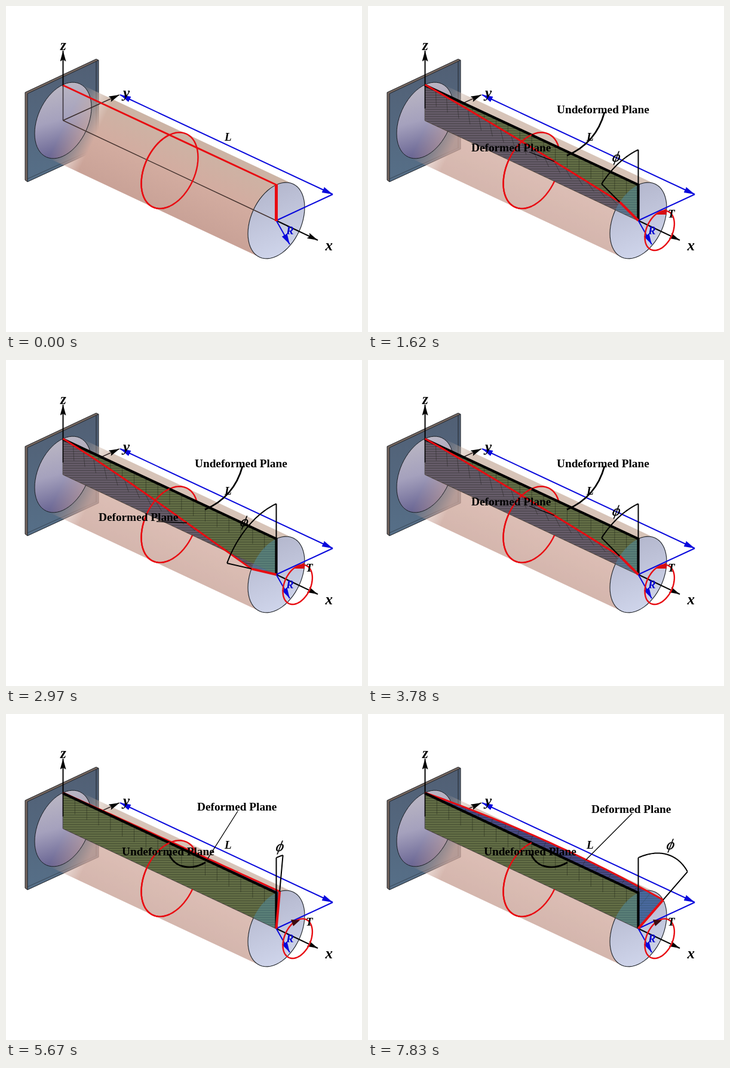
These frames come from a looping animation (596x547 px, 8000 ms). An HTML page:

```html
<!DOCTYPE html>
<html lang="en">
<head>
<meta charset="utf-8">
<title>Shaft in torsion</title>
<style>
  html, body { margin: 0; width: 100%; height: 100%; overflow: hidden; background: #fff; }
  svg { display: block; width: 596px; height: 547px; }
  text { font-family: "Liberation Serif", "Times New Roman", serif; font-weight: bold; }
  .it { font-style: italic; }
  .label { font-size: 19.3px; }
  .line { fill: none; stroke: #000; stroke-width: 2; }
  .blue { fill: none; stroke: #0808dc; stroke-width: 2; }
  .red { fill: none; stroke: #e80c12; stroke-width: 2.4; }
  .edge { fill: none; stroke: #1c2026; stroke-width: 1; }
  .grid { fill: none; stroke: #14180f; stroke-width: 1; opacity: .4; }
</style>
</head>
<body>
<svg viewBox="0 0 596 547">
  <defs>
    <linearGradient id="plateFill" x1="0" y1="0" x2="0" y2="1">
      <stop offset="0" stop-color="#515f74"/><stop offset="1" stop-color="#566f88"/>
    </linearGradient>
    <linearGradient id="baseFill" x1=".3" y1="0" x2=".5" y2="1">
      <stop offset="0" stop-color="#bdb9c4"/><stop offset=".5" stop-color="#a5a1bd"/><stop offset="1" stop-color="#625e8e"/>
    </linearGradient>
    <linearGradient id="endFill" x1=".3" y1="0" x2=".6" y2="1">
      <stop offset="0" stop-color="#b2b5cb"/><stop offset="1" stop-color="#d0d6ec"/>
    </linearGradient>
    <linearGradient id="wallFill" gradientUnits="userSpaceOnUse" x1="302" y1="215" x2="246" y2="337">
      <stop offset="0" stop-color="#ccb4a5"/><stop offset=".5" stop-color="#d3aca0"/><stop offset="1" stop-color="#c9a297"/>
    </linearGradient>
    <linearGradient id="fade" gradientUnits="userSpaceOnUse" x1="100" y1="194" x2="150" y2="218">
      <stop offset="0" stop-color="#000"/><stop offset="1" stop-color="#fff"/>
    </linearGradient>
    <mask id="wallMask" maskUnits="userSpaceOnUse" x="0" y="0" width="596" height="547">
      <rect width="596" height="547" fill="url(#fade)"/>
    </mask>
    <pattern id="hatch" patternUnits="userSpaceOnUse" width="27" height="4">
      <path d="M0 1.5H27" stroke="#10140e" stroke-width="1" opacity=".36"/>
    </pattern>
    <clipPath id="endClip"><path id="endClipPath"/></clipPath>
    <marker id="tipBlack" markerUnits="userSpaceOnUse" markerWidth="18" markerHeight="10" refX="18" refY="5" orient="auto">
      <path d="M0 0L18 5L0 10L3 5Z" fill="#050505"/>
    </marker>
    <marker id="tipBlue" markerUnits="userSpaceOnUse" markerWidth="18" markerHeight="10" refX="18" refY="5" orient="auto-start-reverse">
      <path d="M0 0L18 5L0 10Z" fill="#0808dc"/>
    </marker>
  </defs>

  <!-- wall plate -->
  <path d="M32 145L151 89L155 91L36 147V295L32 292Z" fill="#75665f"/>
  <path d="M36 147L155 91V240L36 295Z" fill="url(#plateFill)"/>
  <path class="edge" d="M32 145L151 89L155 91V240L36 295L32 292ZM36 147L155 91M36 147V295M151 93V239"/>
  <path class="edge" d="M36 290L151 238" opacity=".5"/>
  <path id="base" fill="url(#baseFill)"/>
  <path id="wall" fill="url(#wallFill)" mask="url(#wallMask)"/>
  <path id="baseEdge" class="edge"/>
  <path id="end" fill="url(#endFill)" stroke="#1c2026" stroke-width="1.1"/>

  <!-- axes -->
  <path class="line" d="M95.5 192L190 149" style="stroke:#3a2d2c;stroke-width:1.5" marker-end="url(#tipBlack)"/>
  <path d="M95.5 192L452.5 360" stroke="#43322e" stroke-width="1.4"/>
  <path d="M95.5 192V133" stroke="#3b333b" stroke-width="1.6"/>
  <path class="line" d="M95.5 135V75" marker-end="url(#tipBlack)"/>
  <path id="ring" class="red"/>

  <!-- longitudinal planes -->
  <g id="planes">
    <g id="flat"><path fill="#626d45"/><path fill="url(#hatch)"/><path class="grid"/></g>
    <g id="bent"><path/><path fill="url(#hatch)"/><path class="grid"/></g>
  </g>
  <g id="overlay">
    <g clip-path="url(#endClip)"><path id="tint" fill="#4a9ac4" opacity=".38"/></g>
    <path class="line" d="M95.5 133V172" style="stroke-width:1.5"/>
    <path id="helixUnder" class="red" style="stroke-width:3"/>
    <path class="line" d="M95.5 133L452.5 300V360" style="stroke-width:4.2"/>
    <path id="helixOver" class="red" style="stroke-width:3"/>
  </g>
  <path id="ringFront" class="red"/>
  <path id="rest" d="M95.5 133L452.5 300" class="red" style="stroke-width:3"/>

  <!-- dimensions and tip of the x axis -->
  <path class="blue" d="M191 149L547 316" marker-start="url(#tipBlue)" marker-end="url(#tipBlue)"/>
  <path class="blue" d="M452.5 360L547 316"/>
  <path class="line" d="M452.5 360L522 393" marker-end="url(#tipBlack)"/>
  <path class="blue" d="M452.5 360L475 400" marker-end="url(#tipBlue)"/>
  <path id="restEnd" d="M452.5 299V361" class="red" style="stroke-width:5"/>

  <text class="it" x="91" y="74" font-size="25">z</text>
  <text class="it" x="196" y="154" font-size="25">y</text>
  <text class="it" x="534.5" y="410" font-size="25">x</text>
  <text class="it" x="366" y="226" font-size="19">L</text>
  <text class="it" x="469" y="383" font-size="19" fill="#0000d0">R</text>

  <!-- twist -->
  <g id="twist">
    <path id="phiArc" class="line"/>
    <path id="spoke" class="red" style="stroke-width:4"/>
    <text id="phi" class="it" text-anchor="middle" y="8" font-size="25" style="font-weight:normal" stroke="#000" stroke-width=".4">ϕ</text>
    <path id="torque" class="red"/>
    <path id="torqueTip"/>
    <text class="it" x="502" y="355" font-size="19">T</text>
    <path id="flatLead" class="line" style="stroke-width:2.8"/>
    <path id="bentLead" class="line" style="stroke-width:1.3"/>
    <text id="flatLabel" class="label">Undeformed Plane</text>
    <text id="bentLabel" class="label">Deformed Plane</text>
  </g>
</svg>
<script>
const $ = id => document.getElementById(id);
const LOOP = 8000, STEP = 270, DEG_PER_STEP = 6.8;
const RAD = Math.PI / 180;

// Point on the shaft: s along the axis (0..1), r in radii, a in degrees from z.
function point(s, r, a) {
  const c = r * Math.cos(a * RAD), n = r * Math.sin(a * RAD);
  return [95.5 + 357 * s - 47.5 * n, 192 + 168 * s - 60 * c + 22 * n];
}
const path = pts => "M" + pts.map(p => p.map(v => v.toFixed(2)).join(" ")).join("L");
const range = (n, f) => Array.from({ length: n + 1 }, (_, i) => f(i / n));
const arc = (s, r, from, to) => path(range(60, u => point(s, r, from + (to - from) * u)));
const helix = a => range(40, s => point(s, 1, a * s));
const sheet = a => path([...helix(a), point(1, 0, 0), point(0, 0, 0)]) + "Z";
const ribs = a => range(18, s => path([point(s, 1, a * s), point(s, .55, a * s)])).join("");
const set = (id, d) => $(id).setAttribute("d", d);
const show = (id, on) => { $(id).style.display = on ? "" : "none"; };

function place(id, x, y) {
  $(id).setAttribute("x", x);
  $(id).setAttribute("y", y);
}

function drawSheet(id, a) {
  const [fill, hatch, grid] = $(id).children;
  fill.setAttribute("d", sheet(a));
  hatch.setAttribute("d", sheet(a));
  grid.setAttribute("d", ribs(a));
}

function build() {
  const disc = arc(1, 1, 0, 360) + "Z", base = arc(0, 1, 0, 360) + "Z";
  set("base", base);
  set("baseEdge", base);
  set("end", disc);
  set("endClipPath", disc);
  const side = s => range(40, u => point(s, 1, -36.5 + 180 * u));
  set("wall", path([...side(0), ...side(1).reverse()]) + "Z");
  set("ring", arc(.5, 1, 0, 360));
  set("ringFront", arc(.5, 1, 0, 180));
  set("torque", arc(1.1, .52, 0, 360));
  drawSheet("flat", 0);
}

// Label position, fitted to the twist u (0..1) on either side.
function bentPos(u, front) {
  if (front) {
    const q = (u - 1 / 3) * (u - 2 / 3), v = u - 1 / 3;
    return [195 - 66 * v + 18 * q, 224 + 60 * v + 27 * q];
  }
  const v = u - .111;
  return [320 + 60.75 * v, 162 - 9 * v + 30.4 * v * (u - .556)];
}

function pose(a) {
  const twisted = a !== 0, front = a > 0;
  for (const id of ["planes", "overlay", "twist"]) show(id, twisted);
  for (const id of ["rest", "restEnd"]) show(id, !twisted);
  $("wall").setAttribute("opacity", twisted ? .78 : 1);
  if (!twisted) return;

  drawSheet("bent", a);
  $("bent").firstElementChild.setAttribute("fill", front ? "#655b68" : "#484a84");
  $("planes").append($(front ? "bent" : "flat"));
  set("tint", sheet(0) + sheet(a));
  set(front ? "helixOver" : "helixUnder", path(helix(a)));
  show("helixOver", front);
  show("helixUnder", !front);

  const hub = point(1, 0, 0), rim = point(1, 1, a);
  set("phiArc", arc(1, 1.98, 0, a) + path([rim, point(1, 1.98, a)]) + path([point(1, 1, 0), point(1, 1.98, 0)]));
  set("spoke", path([hub, rim]));
  const [px, py] = point(1, front ? 2.2 : 2.25, a / 2);
  $("phi").setAttribute("transform", `translate(${px} ${py}) skewX(-12)`);

  $("torqueTip").setAttribute("fill", front ? "#d80c12" : "#3c0b0e");
  set("torqueTip", front ? "M482 350L499 340L500 350Z" : "M492 346L477 345L481 356Z");

  const [x, y] = bentPos(Math.abs(a) / 61.2, front);
  place("bentLabel", x, y);
  set("bentLead", path([[x + (front ? 97 : 68), y + 1], point(.668, 1, .668 * a)]));
  place("flatLabel", front ? 316 : 194, front ? 180 : 237);
  set("flatLead", front ? "M396 178Q382 230 333 251" : "M273 235C283 260 312 262 334 249");
}

let last = -1;
function tick() {
  const k = Math.floor(performance.now() % LOOP / STEP);
  if (k !== last) {
    last = k;
    pose(DEG_PER_STEP * (k <= 10 ? k : 20 - k));
  }
  requestAnimationFrame(tick);
}
build();
tick();
</script>
</body>
</html>
```
